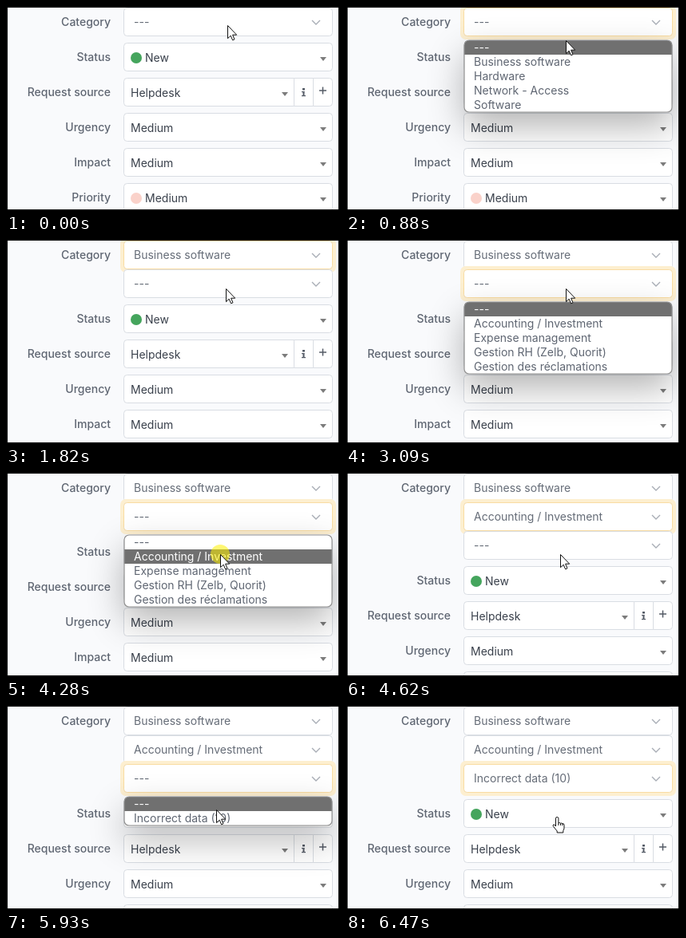
An HTML page with a canvas that plays this animation: 418x257 px, repeating every 6810 ms.

```html
<!DOCTYPE html>
<html lang="en">
<head>
<meta charset="utf-8">
<title>Cascading category selection</title>
<style>
html, body { margin: 0; width: 418px; height: 257px; overflow: hidden; }
canvas { display: block; }
</style>
</head>
<body>
<canvas id="stage" width="418" height="257"></canvas>
<script>
const g = document.getElementById('stage').getContext('2d');
const LOOP = 6810, ROW = 18, SELECT_H = 36, GAP = 44;
const LEFT = 147, WIDTH = 262;

// One entry per cascading select: when it opens, closes and the next one appears.
const levels = [
  { open: 340, close: 1620, appear: 0,
    items: ['---', 'Business software', 'Hardware', 'Network - Access', 'Software'] },
  { open: 2890, close: 4420, appear: 1820,
    items: ['---', 'Accounting / Investment', 'Expense management',
            'Gestion RH (Zelb, Quorit)', 'Gestion des réclamations'] },
  { open: 5410, close: 6470, appear: 4620, items: ['---', 'Incorrect data (10)'] }
];
const clicks = [[340, 480], [1480, 1620], [2890, 3030], [4280, 4420], [5410, 5550], [6270, 6470]];
// start, end, steps, from, to
const moves = [
  [140, 140, 1, [277, 24], [276, 23]],
  [740, 1200, 8, [276, 23], [275, 62]],
  [3410, 3690, 5, [275, 62], [268, 103]],
  [5700, 6070, 6, [268, 103], [262, 138]],
  [6130, 6130, 1, [262, 138], [262, 140]]
];
const fields = [
  { label: 'Status', value: 'New', dot: '#45a55d' },
  { label: 'Request source', value: 'Helpdesk', buttons: true },
  { label: 'Urgency', value: 'Medium' },
  { label: 'Impact', value: 'Medium' },
  { label: 'Priority', value: 'Medium', dot: '#fad2ca' }
];
const arrow = new Path2D('M.5 .5V16.7L4.2 13.2L6.6 18.8L9 17.8L6.6 12.2H11.7Z');
const hand = new Path2D('M4.5 12V2.2a1.7 1.7 0 0 1 3.4 0V8q1.4-1.2 2.6.3q1.4-.8 2.4.5' +
  'q2-.6 2.1 1.6V14q0 2-1.2 3.5V20H6.2V18Q3.6 15 1 11.5Q1.2 9.2 3 10.2Z' +
  'M7.9 8V11M10.5 8.3V11M12.9 8.8V11.2');

const clamp = v => Math.max(0, Math.min(1, v));

function text(s, x, y, color, weight = 400, align = 'left') {
  g.font = `${weight} 14px Inter, sans-serif`;
  g.textAlign = align;
  g.fillStyle = color;
  g.fillText(s, x, y);
}

function label(s, y) { text(s, 131, y, '#5f6672', 500, 'right'); }

function rounded(x, y, w, h, r) {
  const p = new Path2D();
  p.roundRect(x, y, w, h, r);
  return p;
}

function box(x, y, w, radius = 4, border = '#d9dde3') {
  const p = rounded(x + .5, y + .5, w - 1, SELECT_H - 1, radius);
  g.fillStyle = '#fff';
  g.fill(p);
  g.strokeStyle = border;
  g.lineWidth = 1;
  g.stroke(p);
}

function disc(x, y, r, color) {
  g.fillStyle = color;
  g.beginPath();
  g.arc(x, y, r, 0, 7);
  g.fill();
}

function line(color, width, ...pts) {
  g.strokeStyle = color;
  g.lineWidth = width;
  g.beginPath();
  pts.forEach(([x, y]) => g.lineTo(x, y));
  g.stroke();
}

function caret(x, y) {
  g.fillStyle = '#7c7c7c';
  g.fill(new Path2D(`M${x - 4} ${y - 2}h8l-4 5z`));
}

function drawField(f, c) {
  label(f.label, c + 5);
  const top = c - 18;
  if (f.buttons) {
    box(LEFT, top, 214, [4, 0, 0, 4]);
    box(360, top, 25, 0);
    box(384, top, 25, [0, 4, 4, 0]);
    g.fillStyle = '#545b66';
    g.fillRect(371, c - 5, 3, 2.5);
    g.fillRect(370, c - 1, 3.5, 1.2);
    g.fillRect(371.5, c - 1, 2, 6);
    g.fillRect(370, c + 4, 5, 1.2);
    line('#545b66', 1.5, [392, c - 2], [401, c - 2]);
    line('#545b66', 1.5, [396.5, c - 6.5], [396.5, c + 2.5]);
  } else {
    box(LEFT, top, WIDTH);
  }
  if (f.dot) disc(163, c + 1, 7, f.dot);
  text(f.value, f.dot ? 174 : 156, c + 6, '#3a414c');
  caret(f.buttons ? 349 : 397, c + 2);
}

function drawLevel(level, i, t) {
  const top = 2 + i * SELECT_H;
  const next = levels[i + 1];
  const glow = clamp((t - level.open) / 140) * (next ? 1 - clamp((t - next.open) / 140) : 1);
  if (glow) {
    g.globalAlpha = glow;
    g.fillStyle = '#fdefd0';
    g.fill(rounded(LEFT - 4, top - 4, WIDTH + 8, SELECT_H + 8, 7));
    g.globalAlpha = 1;
  }
  box(LEFT, top, WIDTH);
  if (glow) {
    g.globalAlpha = glow;
    box(LEFT, top, WIDTH, 4, '#f9dca2');
    g.globalAlpha = 1;
  }
  text(level.items[t >= level.close ? 1 : 0], 160, top + 23, '#666d78');
  line('#a9aeb6', 1.4, [383, top + 16], [388, top + 21], [393, top + 16]);
}

function drawPopup(level, i, t, tipY) {
  const top = 43 + i * SELECT_H, h = level.items.length * ROW;
  const frame = rounded(148, top, 260, h, 6);

  // The shadow and rim come first, the list then fades in.
  g.save();
  const outside = new Path2D('M0 0H418V257H0Z');
  outside.addPath(frame);
  g.clip(outside, 'evenodd');
  g.shadowColor = 'rgba(0,0,0,.3)';
  g.shadowBlur = 45;
  g.shadowOffsetY = 18;
  g.fillStyle = '#000';
  g.fill(frame);
  g.restore();

  g.save();
  g.globalAlpha = clamp((t - level.open - 60) / 130);
  g.clip(frame);
  g.fillStyle = '#fff';
  g.fillRect(148, top, 260, h);
  const active = Math.max(0, Math.floor((tipY - top) / ROW));
  g.fillStyle = '#707070';
  g.fillRect(148, top + active * ROW, 260, ROW);
  level.items.forEach((s, k) =>
    text(s, 160, top + k * ROW + 14, k === active ? '#fff' : '#5f6672'));
  g.restore();

  g.strokeStyle = '#929292';
  g.lineWidth = 1.2;
  g.stroke(frame);
}

function pointer(t) {
  let at = moves[0][3];
  for (const [start, end, steps, from, to] of moves) {
    if (t < start) break;
    const k = t >= end ? steps : 1 + Math.floor((t - start) / (end - start) * (steps - 1));
    const p = 1 - (1 - k / steps) ** 1.5;
    at = from.map((v, i) => Math.round(v + (to[i] - v) * p));
  }
  return at;
}

function drawPointer(t, x, y) {
  if (clicks.some(([a, b]) => t >= a && t < b)) disc(x, y, 12, 'rgba(255,240,0,.55)');
  const done = t >= 6470;
  g.save();
  g.translate(done ? x - 4 : x, y);
  g.fillStyle = '#fff';
  g.strokeStyle = '#111';
  g.lineWidth = 1;
  g.fill(done ? hand : arrow);
  g.stroke(done ? hand : arrow);
  g.restore();
}

function draw(t) {
  g.fillStyle = '#f9fafc';
  g.fillRect(0, 0, 418, 257);
  const shown = levels.filter(l => t >= l.appear);
  const shift = (shown.length - 1) * SELECT_H;
  const [x, y] = pointer(t);

  label('Category', 25);
  fields.forEach((f, k) => drawField(f, 64 + k * GAP + shift));
  shown.forEach((l, i) => drawLevel(l, i, t));
  shown.forEach((l, i) => {
    if (t >= l.open && t < l.close) drawPopup(l, i, t, y);
  });
  drawPointer(t, x, y);

  g.strokeStyle = '#000';
  g.lineWidth = 2;
  g.strokeRect(1, 1, 416, 255);
}

const began = performance.now();
function tick() {
  draw((performance.now() - began) % LOOP);
  requestAnimationFrame(tick);
}
tick();
</script>
</body>
</html>
```
